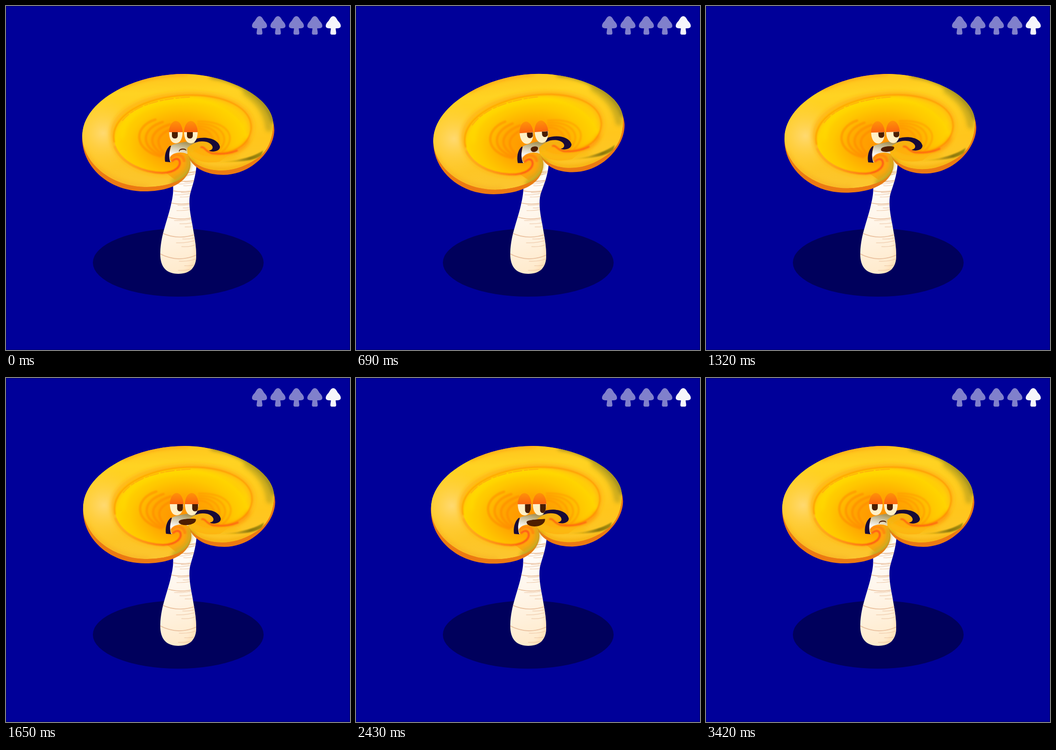
An HTML page that plays this animation: 709 by 709 pixels, repeating every 3480 ms.

```html
<!DOCTYPE html>
<html lang="en">
<head>
<meta charset="utf-8">
<title>Mushroom</title>
<style>
html, body { margin: 0; width: 100%; height: 100%; overflow: hidden; background: #009; }
svg { display: block; width: 100vw; height: 100vh; }
.line { fill: none; stroke-linecap: round; stroke-linejoin: round; }
.soft { filter: url(#b1); }
.haze { filter: url(#b4); }
</style>
</head>
<body>
<svg viewBox="0 0 709 709">
  <defs>
    <filter id="b1" x="-20%" y="-20%" width="140%" height="140%"><feGaussianBlur stdDeviation="1.2"/></filter>
    <filter id="b4" x="-40%" y="-40%" width="180%" height="180%"><feGaussianBlur stdDeviation="4"/></filter>
    <linearGradient id="skin" gradientUnits="userSpaceOnUse" x1="335" y1="350" x2="385" y2="545">
      <stop offset="0" stop-color="#fff"/><stop offset=".45" stop-color="#fff6ea"/><stop offset="1" stop-color="#ffeacb"/>
    </linearGradient>
    <linearGradient id="face" gradientUnits="userSpaceOnUse" x1="364" y1="281" x2="358" y2="310">
      <stop offset="0" stop-color="#a8965c"/><stop offset=".5" stop-color="#d8cfb4"/><stop offset="1" stop-color="#fff"/>
    </linearGradient>
    <linearGradient id="outer" gradientUnits="userSpaceOnUse" x1="330" y1="140" x2="340" y2="375">
      <stop offset="0" stop-color="#ffc41c"/><stop offset=".16" stop-color="#ffd322"/>
      <stop offset=".6" stop-color="#ffc61c"/><stop offset="1" stop-color="#fbc530"/>
    </linearGradient>
    <radialGradient id="shine" gradientUnits="userSpaceOnUse" cx="200" cy="262" r="75">
      <stop offset="0" stop-color="#ffd970"/><stop offset="1" stop-color="#ffd040" stop-opacity="0"/>
    </radialGradient>
    <radialGradient id="inner" gradientUnits="userSpaceOnUse" cx="0" cy="0" r="1" gradientTransform="translate(362 284) scale(150 104)">
      <stop offset="0" stop-color="#ff9200"/><stop offset=".4" stop-color="#ffa600"/>
      <stop offset=".72" stop-color="#ffc800"/><stop offset=".9" stop-color="#ffd400"/><stop offset="1" stop-color="#ffbe10"/>
    </radialGradient>
    <linearGradient id="lid" x1="0" y1="0" x2="0" y2="1">
      <stop offset="0" stop-color="#ff9208"/><stop offset=".5" stop-color="#fb6510"/>
    </linearGradient>
    <linearGradient id="fold" gradientUnits="userSpaceOnUse" x1="435" y1="0" x2="525" y2="0">
      <stop offset="0" stop-color="#c09a0c" stop-opacity="0"/><stop offset=".75" stop-color="#8a770c"/><stop offset="1" stop-color="#a08a10"/>
    </linearGradient>
    <linearGradient id="ember" gradientUnits="userSpaceOnUse" x1="235" y1="0" x2="345" y2="0">
      <stop offset="0" stop-color="#ff9a10" stop-opacity=".5"/><stop offset="1" stop-color="#ff5a12"/>
    </linearGradient>
    <path id="body" d="M157 272C157 196 262 140 367 140C450 140 553 186 553 256C552 299 505 348 448 348C415 348 392 336 381 320
      C372 310 371 298 374 293L374 306C383 318 382 336 372 350C357 372 325 382 285 382C210 382 157 330 157 272Z"/>
    <path id="top" d="M157 268C157 196 262 140 367 140C450 140 553 186 551 246C549 274 541 296 522 311C498 329 470 339 444 339
      C414 339 392 329 381 315C374 308 371 298 374 293L374 306C382 318 381 337 370 349C350 368 315 373 285 373C214 371 158 322 157 268Z"/>
    <path id="dish" d="M221 264C220 217 290 186 370 183C445 181 506 207 505 250C504 284 468 306 430 305L413 297L360 300L354 318
      C362 333 348 346 318 343C265 338 222 308 221 264Z"/>
    <clipPath id="topClip"><use href="#top"/></clipPath>
    <clipPath id="dishClip"><use href="#dish"/></clipPath>
    <clipPath id="stemClip"><path class="stem"/></clipPath>
    <clipPath id="ballClip"><path id="white" d="M-14 0H14C14 13 9 23 0 23S-14 13 -14 0Z"/></clipPath>
    <path id="icon" d="M0 21C5 21 7 27 10 31C13 34 15.5 37 15.5 41C15.5 45 12 46 7 46H5C5 50 6 52 6 56C6 58 5 59 3 59
      H-3C-5 59 -6 58 -6 56C-6 52 -5 50 -5 46H-7C-12 46 -15.5 45 -15.5 41C-15.5 37 -13 34 -10 31C-7 27 -5 21 0 21Z"/>
  </defs>

  <rect width="709" height="709" fill="#009"/>
  <rect x=".5" y=".5" width="708" height="708" fill="none" stroke="#00006c"/>
  <g id="icons" fill="#fff"></g>
  <ellipse cx="355" cy="529" rx="176" ry="70" fill="#00005c"/>

  <path class="stem" fill="url(#skin)"/>
  <g clip-path="url(#stemClip)" class="line" stroke="#e9bf9c">
    <path class="haze" d="M391 470C396 500 396 535 368 551" stroke="#ffdfb4" stroke-width="8"/>
    <g id="rings"></g>
  </g>

  <g id="cap">
    <use href="#body" fill="#ec7a12"/>
    <g clip-path="url(#topClip)" class="line">
      <use href="#top" fill="url(#outer)"/>
      <rect x="120" y="180" width="170" height="170" fill="url(#shine)"/>
      <path class="haze" d="M240 166C290 144 335 140 372 140" stroke="#ff8a18" stroke-width="4"/>
      <path class="haze" d="M425 144C485 152 535 190 550 238" stroke="#857b20" stroke-width="9"/>
      <path class="haze" d="M495 178C525 200 538 222 542 252" stroke="#b09b1c" stroke-width="14" opacity=".6"/>
      <path class="haze" d="M383 322C380 344 366 358 346 366" stroke="#a39322" stroke-width="10" opacity=".85"/>
      <path class="haze" d="M161 296C178 340 235 371 290 373" stroke="#f7a51c" stroke-width="5" opacity=".7"/>
      <path class="haze" d="M378 314C405 342 465 346 520 316" stroke="#f3a40c" stroke-width="5"/>
      <path class="soft" d="M435 320C470 320 505 314 530 298L526 309C505 321 470 323 435 320Z" fill="url(#fold)" stroke="none"/>
      <use class="haze" href="#dish" stroke="#ffb514" stroke-width="12"/>
      <use href="#dish" fill="url(#inner)"/>
      <g clip-path="url(#dishClip)">
        <path class="haze" d="M240 270C240 220 300 196 370 194S492 212 494 250" stroke="#ffdc00" stroke-width="5"/>
        <g id="swirls" class="soft"></g>
      </g>
      <path class="soft" d="M223 280C212 225 290 187 370 184S510 210 505 255C500 290 462 306 430 304" stroke="#ff9705" stroke-width="3" opacity=".8"/>
      <path d="M240 236C265 205 320 190 380 188" stroke="#ffb20c" stroke-width="2" stroke-dasharray="18 5 7 3"/>
      <path class="haze" d="M374 288C395 287 405 300 438 306C468 306 490 294 498 277" stroke="#ff8008" stroke-width="6" opacity=".75"/>
    </g>

    <path d="M341 287C362 280 384 277 397 280L374 293V306L360 308L338 322L336 304Z" fill="url(#face)"/>
    <path d="M338 288C329 295 326 310 328 321L339 322C335 313 336 301 340 288Z" fill="#170a38"/>
    <g class="line">
      <path d="M374 305C362 299 344 301 338 312C337 320 341 324 347 319C357 319 358 330 350 337L330 344L348 358
        C374 346 386 325 374 305Z" fill="#ffa40e"/>
      <path class="haze" d="M375 312C382 330 370 350 348 356" stroke="#c8a81c" stroke-width="7"/>
      <path class="soft" d="M224 290C238 326 285 343 322 344C352 343 362 328 357 318C354 313 347 315 343 319" stroke="url(#ember)" stroke-width="4"/>
      <path class="soft" d="M341 312C350 303 365 306 367 319" stroke="#ff8010" stroke-width="6" opacity=".7"/>
      <path d="M374 293C382 283 402 277 418 281C431 286 430 297 417 298C430 308 452 305 462 305L440 321C405 326 375 316 374 293Z" fill="#ffae0c"/>
      <path class="haze" d="M379 298C390 316 420 321 475 312" stroke="#fabe14" stroke-width="8"/>
      <path class="haze" d="M379 297C384 290 404 281 417 287" stroke="#e9b515" stroke-width="7" opacity=".8"/>
      <path class="soft" d="M402 291C409 289 411 301 426 304C443 306 461 304 476 298" stroke="#ff6810" stroke-width="3.5"/>
    </g>
    <path d="M391 274C410 268 437 273 441 290C441 300 425 302 418 298C431 296 427 284 413 280C404 278 396 279 388 282Z" fill="#170a38"/>
    <g id="eyes"></g>
    <path id="mouth" fill="#4f1e00" stroke="#4f1e00" stroke-width="1.2" stroke-linejoin="round"/>
  </g>
</svg>

<script>
const LOOP = 3480;
const $ = id => document.getElementById(id);
const fill = (id, n, make) => { $(id).innerHTML = Array.from({ length: n }, (_, i) => make(i)).join(''); };
const stroke = (d, w, more = '') => `<path d="${d}" stroke-width="${w}" ${more}/>`;

fill('icons', 5, i => `<use href="#icon" x="${522.5 + 38 * i}" opacity="${i < 4 ? .5 : .96}"/>`);

// Rings crowd together and flatten towards the cap, with three short creases under each.
fill('rings', 7, i => {
  const k = .83 ** i, gap = 43 * k, y = 510 - 43 * (1 - k) / (1 - .83);
  const creases = [1, 2, 3].map(j => {
    const x = 346 + (i * 7 + j * 11) % 24, cy = y + gap * (.15 + j * .22);
    return stroke(`M${x} ${cy}Q${x + 22} ${cy + 1} 394 ${cy - 6}`, 1.2, 'opacity=".75"');
  });
  return stroke(`M${316 + 4 * i} ${y}Q355 ${y + 21 * k} 395 ${y + 2}`, 1.7) + creases.join('');
});

// Each side of the dish curls towards the face in nested arcs.
fill('swirls', 4, i => {
  const left = 262 + 15 * i, right = 478 - 12 * i, y = 234 + 5 * i;
  return stroke(`M${318 + 3 * i} ${310 - 2 * i}C${left} ${296 - 4 * i} ${left} ${y + 14} ${left + 46} ${y}`, 5, 'stroke="#ff8600" opacity=".5"')
    + stroke(`M396 ${y + 4}C${right - 18} ${y + 2} ${right} ${y + 40} ${right - 32} 300`, 4, 'stroke="#ff8c00" opacity=".4"');
});

fill('eyes', 2, i => `<g transform="translate(${350 + 31 * i} 260)">
  <ellipse rx="14" ry="23" fill="url(#lid)"/><use href="#white" fill="#fff0c6"/>
  <g clip-path="url(#ballClip)"><rect class="pupil" x="-6" y="-10" width="12" height="23" rx="5.5" fill="#4a1d00"/></g></g>`);

const stems = document.querySelectorAll('.stem');
const pupils = document.querySelectorAll('.pupil');

// Smooth step from 0 to 1 between two times.
function ease(t, from, to) {
  const u = Math.min(1, Math.max(0, (t - from) / (to - from)));
  return u * u * (3 - 2 * u);
}

// Rounded bump of height 1 around a time.
function hump(t, mid, half) {
  const u = Math.min(1, Math.abs(t - mid) / half);
  return Math.cos(u * Math.PI / 2) ** 2;
}

function stemPath(s) {
  return `M355 552C328 552 317 535 318 508C319 470 334 440 341 405
    C345 388 345 378 ${344 + s * .4} 365L${350 + s} 312H${393 + s}
    C${394 + s} 340 ${387 + s * .7} 362 ${381 + s * .3} 382
    C375 400 379 425 384 450C388 475 392 490 392 515C392 538 380 552 355 552Z`;
}

function mouthPath(look, wide, drop) {
  const w = 14 + 23 * wide, x = 364 + 9 * wide - w / 2, r = x + w;
  const mid = 298.5 - 4.5 * look, tilt = w * .075;
  const up = mid - 5.5 + 3 * drop, low = mid - 4 + 12 * look + 7 * drop;
  return `M${x} ${mid + tilt}C${x} ${up} ${r} ${up} ${r} ${mid - tilt}C${r} ${low} ${x} ${low} ${x} ${mid + tilt}Z`;
}

function draw(t) {
  const turn = -4.5 * hump(t, 860, 850) + .9 * hump(t, 2010, 400) - 2.6 * hump(t, 2850, 570);
  const shift = 4.8 * hump(t, 1200, 900) - 4.4 * hump(t, 2140, 650);
  const away = ease(t, 2850, 3300);
  const look = ease(t, 240, 690) - away;
  const wide = ease(t, 690, 1900) - away;
  const drop = ease(t, 1320, 2010) - ease(t, 2430, 2850);

  $('cap').setAttribute('transform', `translate(${shift} 0) rotate(${turn} 367 270)`);
  stems.forEach(el => el.setAttribute('d', stemPath(-turn * 1.1)));
  pupils.forEach(el => el.setAttribute('transform', `translate(${-2 + 9 * look} ${7 * drop - 1.5 * look})`));
  $('mouth').setAttribute('d', mouthPath(look, wide, drop));
}

const start = performance.now();
function tick() {
  draw((performance.now() - start) % LOOP);
  requestAnimationFrame(tick);
}
tick();
</script>
</body>
</html>
```
